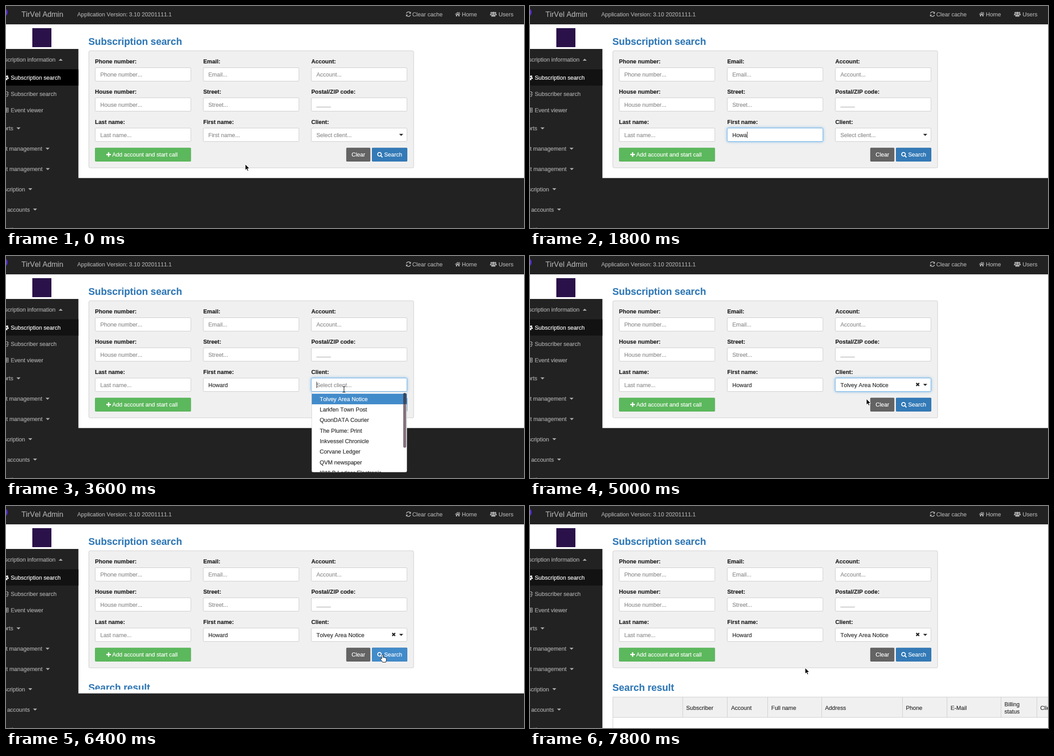
Recreate the animation shown at these times as an HTML page. Size 1141 by 491 pixels, loop 8 s.

```html
<!DOCTYPE html>
<html lang="en">
<head>
<meta charset="utf-8">
<style>
  html, body { margin: 0; width: 100%; height: 100%; overflow: hidden; background: #222; }
  svg { display: block; width: 1141px; height: 491px; }
  text {
    font: 12.52px "Liberation Sans", Arial, sans-serif; font-kerning: none; white-space: pre;
    color: #2b2b2b; fill: currentColor; stroke: currentColor; stroke-width: .2px;
  }
  .label text { font-weight: bold; color: #222; }
  .hint text { color: #8c8c8c; }
  .hint .mask { font-size: 11.26px; }
  .title { font-size: 21.46px; font-weight: bold; color: #337ab7; }
  .dark text { color: #acacac; }
  .dark .brand { font-size: 16.1px; }
  .dark .end { text-anchor: end; }
  .dark .on, .white text { color: #fff; }
  .icon { fill: none; stroke: #acacac; stroke-width: 1.7; }
  .thin { stroke-width: 1.2; }
  .glow { fill: #fff; stroke: #66afe9; filter: drop-shadow(0 0 3px rgba(102, 175, 233, .8)); }

  /* Every change is a hard cut on a shared eight second clock */
  .a { animation: 8s step-end -20ms infinite; }
  .active { animation-name: active; }
  .typing { animation-name: typing; }
  .typing-caret { animation-name: typing-caret; }
  .name-hint { animation-name: name-hint; }
  .name-glow { animation-name: name-glow; }
  .client-hover { animation-name: client-hover; }
  .client-glow { animation-name: client-glow; }
  .client-hint { animation-name: client-hint; }
  .client-arrow { animation-name: client-arrow; }
  .picked { animation-name: picked; }
  .menu { animation-name: menu; }
  .clear-hover { animation-name: clear-hover; }
  .search-hover { animation-name: search-hover; }
  .shutter { animation-name: shutter; }
  .pointer { animation-name: pointer; }
  .arrow { animation-name: arrow; }
  .beam { animation-name: beam; }
  .hand { animation-name: hand; }

  @keyframes active { 0% { fill: #000 } 2.5%, 100% { fill: #121212 } }
  @keyframes typing {
    0% { transform: translateX(0) }
    15% { transform: translateX(9px) }
    17.5% { transform: translateX(16px) }
    20% { transform: translateX(25px) }
    22.5% { transform: translateX(32px) }
    25% { transform: translateX(36.3px) }
    27.5%, 100% { transform: translateX(43.6px) }
  }
  @keyframes typing-caret { 0%, 32.5%, 100% { opacity: 0 } 10% { opacity: 1 } }
  @keyframes name-hint { 0% { opacity: 1 } 15%, 100% { opacity: 0 } }
  @keyframes name-glow { 0%, 40%, 100% { opacity: 0 } 10% { opacity: .35 } 12.5% { opacity: 1 } }
  @keyframes client-hover { 0%, 40%, 100% { opacity: 0 } 35% { opacity: 1 } }
  @keyframes client-glow { 0%, 77.5%, 100% { opacity: 0 } 40% { opacity: 1 } 70% { opacity: .8 } }
  @keyframes client-hint { 0% { opacity: 1 } 62.5%, 100% { opacity: 0 } }
  @keyframes client-arrow { 0%, 62.5%, 100% { opacity: 1 } 40% { opacity: 0 } }
  @keyframes picked { 0% { opacity: 0 } 62.5%, 100% { opacity: 1 } }
  @keyframes menu { 0%, 62.5%, 100% { opacity: 0 } 42.5% { opacity: 1 } }
  @keyframes clear-hover { 0%, 72.5%, 100% { opacity: 0 } 65% { opacity: 1 } }
  @keyframes search-hover { 0%, 85%, 100% { opacity: 0 } 75% { opacity: 1 } }
  @keyframes shutter {
    0% { transform: translateY(0) }
    80% { transform: translateY(34px) }
    82.5%, 100% { transform: translateY(150px) }
  }
  @keyframes arrow { 0%, 32.5%, 62.5%, 85%, 100% { opacity: 1 } 7.5%, 35%, 65% { opacity: 0 } }
  @keyframes beam { 0%, 15%, 32.5%, 50%, 100% { opacity: 0 } 7.5%, 30%, 40% { opacity: 1 } }
  @keyframes hand { 0%, 40%, 62.5%, 85%, 100% { opacity: 0 } 35%, 50%, 65% { opacity: 1 } }
  @keyframes pointer {
    0% { transform: translate(527px, 350px) }
    2.5% { transform: translate(520px, 337px) }
    5% { transform: translate(499px, 308px) }
    7.5% { transform: translate(478px, 287px) }
    10% { transform: translate(475.5px, 285.5px) }
    30% { transform: translate(482px, 286px) }
    32.5% { transform: translate(655px, 293px) }
    35% { transform: translate(736px, 292px) }
    37.5% { transform: translate(742px, 290px) }
    40% { transform: translate(744.5px, 295px) }
    50% { transform: translate(744px, 308px) }
    52.5% { transform: translate(743px, 313px) }
    55% { transform: translate(742px, 315px) }
    57.5% { transform: translate(741px, 316px) }
    65% { transform: translate(753px, 318px) }
    67.5% { transform: translate(763px, 321px) }
    70% { transform: translate(770px, 323px) }
    72.5% { transform: translate(805px, 327px) }
    75% { transform: translate(828px, 329px) }
    77.5% { transform: translate(829px, 329px) }
    85% { transform: translate(798px, 348px) }
    87.5% { transform: translate(738px, 353px) }
    90% { transform: translate(676px, 356px) }
    92.5% { transform: translate(634px, 358px) }
    95% { transform: translate(612px, 358px) }
    97.5%, 100% { transform: translate(606px, 358px) }
  }
</style>
</head>
<body>
<svg viewBox="0 0 1141 491">
  <defs>
    <rect id="box" width="210.7" height="29.7" rx="2"/>
    <path id="down" d="M-4.5 -2H4.5L0 2.5Z"/>
    <g id="people">
      <circle cx="-4.5" cy="-2.5" r="1.9"/><circle cx="4.5" cy="-2.5" r="1.9"/><circle cy="-2" r="2.8"/>
      <path d="M-7.5 3V1q0-1.5 2-1.5h2.2L-4.6 3ZM7.5 3V1q0-1.5-2-1.5H3.3L4.6 3ZM-4.5 6V4q0-3 3-3h3q3 0 3 3v2Z"/>
    </g>
  </defs>

  <rect width="1141" height="491" fill="#222"/>
  <path d="M159.500 40.500H1141V491H159.500ZM0 40.500H159.500V95H0Z" fill="#fff"/>
  <path d="M0 39.500H1141" stroke="#0c0c0c"/>

  <!-- Top bar -->
  <g class="dark">
    <circle cx="-7" cy="14" r="10.5" fill="#5b2fd6"/>
    <text class="brand" x="34" y="23.5">TirVel Admin</text>
    <text x="157" y="22.5">Application Version: 3.10 20201111.1</text>
    <g class="icon">
      <path d="M882 16.5a4.8 4.8 0 0 1 8.6-1.5M891 19.5a4.8 4.8 0 0 1-8.6 1.5"/>
      <path d="M892 12.5v4.6h-4.6ZM881 23.5v-4.6h4.6Z" fill="#acacac" stroke="none"/>
    </g>
    <text x="895" y="22.5">Clear cache</text>
    <path d="M989 18.3 995 13l6 5.3-.8 1L995 14.7 989.8 19.3ZM991 19.3l4-3.4 4 3.4V23h-2.8v-3h-2.4v3H991ZM998 13.4h1.5v3l-1.5-1.4Z" fill="#acacac"/>
    <text x="1004" y="22.5">Home</text>
    <use href="#people" x="1073.5" y="17.5" fill="#acacac"/>
    <text x="1085" y="22.5">Users</text>
  </g>

  <!-- Sidebar -->
  <rect x="58" y="49" width="42" height="42" fill="#2a1149"/>
  <g class="dark">
    <rect class="a active" y="140" width="159.5" height="36"/>
    <text class="end" x="109" y="122.5">Subscription information</text>
    <use href="#people" x="-1.5" y="158" fill="#fff"/>
    <text class="on" x="10.5" y="163">Subscription search</text>
    <path class="icon thin" d="M-4 189.5H3.5V200H-4M5.2 191v2M5.2 195v2M-2 196.5q2-3 3.5 0M0 193v1"/>
    <text x="10.5" y="199">Subscriber search</text>
    <path class="icon thin" d="M-5 225.5H4.8V235H-5M-5 228.5H5M-5 231.5H5M1 226V235"/>
    <text x="10.5" y="234.7">Event viewer</text>
    <text class="end" x="16" y="275">Reports</text>
    <text class="end" x="80" y="320">Client management</text>
    <text class="end" x="80.5" y="364.7">Product management</text>
    <text class="end" x="42" y="409.5">Subscription</text>
    <text class="end" x="52.5" y="454.5">User accounts</text>
    <text class="end" x="36" y="499.3">Settings</text>
    <g fill="#acacac">
      <path d="M116 121H125L120.5 116.5Z"/>
      <use href="#down" x="27.5" y="270.5"/>
      <use href="#down" x="91.5" y="315.5"/>
      <use href="#down" x="92" y="360.5"/>
      <use href="#down" x="53.5" y="405"/>
      <use href="#down" x="64" y="450"/>
    </g>
  </g>

  <!-- Search form -->
  <text class="title" x="181.5" y="86">Subscription search</text>
  <rect x="182.5" y="99" width="715.5" height="259" rx="3" fill="#f0f0f0" stroke="#ccc"/>
  <g class="label">
    <text x="196" y="127.3">Phone number:</text>
    <text x="434.5" y="127.3">Email:</text>
    <text x="672.5" y="127.3">Account:</text>
    <text x="196" y="193.5">House number:</text>
    <text x="434.5" y="193.5">Street:</text>
    <text x="672.5" y="193.5">Postal/ZIP code:</text>
    <text x="196" y="260.7">Last name:</text>
    <text x="434.5" y="260.7">First name:</text>
    <text x="672.5" y="260.7">Client:</text>
  </g>
  <g fill="#fff" stroke="#c8c8c8">
    <use href="#box" x="196.5" y="136.5"/><use href="#box" x="434.5" y="136.5"/><use href="#box" x="672.5" y="136.5"/>
    <use href="#box" x="196.5" y="203"/><use href="#box" x="434.5" y="203"/><use href="#box" x="672.5" y="203"/>
    <use href="#box" x="196.5" y="270"/><use href="#box" x="434.5" y="270"/><use href="#box" x="672.5" y="270"/>
  </g>
  <use class="a glow name-glow" href="#box" x="434.5" y="270"/>
  <use class="a client-hover" href="#box" x="672.5" y="270" fill="#e4e4e4" stroke="#adadad"/>
  <use class="a glow client-glow" href="#box" x="672.5" y="270"/>

  <text x="445.7" y="289.5">Howard</text>
  <g class="a typing">
    <rect x="445.5" y="276" width="60" height="18" fill="#fff"/>
    <path class="a typing-caret" d="M446.5 278V292" stroke="#222"/>
  </g>
  <g class="hint">
    <text x="207.7" y="156.3">Phone number...</text>
    <text x="445.7" y="156.3">Email...</text>
    <text x="683.7" y="156.3">Account...</text>
    <text x="207.7" y="222.7">House number...</text>
    <text x="445.7" y="222.7">Street...</text>
    <text class="mask" x="684" y="222">_____</text>
    <text x="207.7" y="289.5">Last name...</text>
    <text class="a name-hint" x="445.7" y="289.5">First name...</text>
    <text class="a client-hint" x="683.7" y="289.5">Select client...</text>
  </g>
  <g class="a picked">
    <text x="683.7" y="289.5">Tolvey Area Notice</text>
    <path d="M850.8 281 857.2 287.4M857.2 281 850.8 287.4" stroke="#222" stroke-width="2.6"/>
  </g>
  <use class="a client-arrow" href="#down" x="870.5" y="284.8" fill="#222"/>

  <!-- Buttons -->
  <g class="white">
    <rect x="196.5" y="314" width="210.5" height="29.5" rx="1" fill="#5cb85c" stroke="#52b152"/>
    <path d="M221 328.5H231M226 323.5V333.5" stroke="#fff" stroke-width="2.8"/>
    <text x="234" y="333">Add account and start call</text>
    <rect x="750" y="314" width="52" height="29.5" rx="1" fill="#636363" stroke="#595959"/>
    <rect class="a clear-hover" x="750" y="314" width="52" height="29.5" rx="1" fill="#747474" stroke="#595959"/>
    <text x="761.3" y="333">Clear</text>
    <rect x="806.5" y="314" width="77" height="29.5" rx="1" fill="#337ab7" stroke="#2f72ad"/>
    <rect class="a search-hover" x="806.5" y="314" width="77" height="29.5" rx="1" fill="#428bca" stroke="#3b82bf"/>
    <g fill="none" stroke="#fff" stroke-width="2">
      <circle cx="822.7" cy="328" r="4"/><path d="M825.5 331 829.3 334.8"/>
    </g>
    <text x="833" y="333">Search</text>
  </g>

  <!-- Results, uncovered by the shutter -->
  <text class="title" x="181.5" y="409.3">Search result</text>
  <path d="M182.5 422.5H1142V467.5H182.5Z" fill="#f0f0f0"/>
  <path d="M1142 422.5H182.5V491M182.5 467.5H1142M336.5 422.5v45M434.5 422.5v45M523.5 422.5v45M642.5 422.5v45M820.5 422.5v45M918.5 422.5v45M1037.5 422.5v45M1116.5 422.5v45" fill="none" stroke="#ccc"/>
  <text x="344" y="451">Subscriber</text>
  <text x="443" y="451">Account</text>
  <text x="531.5" y="451">Full name</text>
  <text x="650" y="451">Address</text>
  <text x="828" y="451">Phone</text>
  <text x="926.5" y="451">E-Mail</text>
  <text x="1045" y="443">Billing</text>
  <text x="1045" y="459">status</text>
  <text x="1124" y="451">Client</text>
  <g class="a shutter">
    <rect x="160" y="372" width="981" height="9" fill="#fff"/>
    <rect x="159" y="380.5" width="982" height="120" fill="#222"/>
  </g>

  <!-- Client menu -->
  <g class="a menu">
    <path d="M684.5 278V292" stroke="#222"/>
    <path d="M673.5 301H883V475q0 3-3 3H676.5q-3 0-3-3Z" fill="#fff" stroke="#bbb" stroke-width=".6"/>
    <rect x="673.5" y="304.5" width="209.5" height="23.5" fill="#428bca"/>
    <text x="691" y="320.6" style="color:#fff">Tolvey Area Notice</text>
    <text x="691" y="344">Larkfen Town Post</text>
    <text x="691" y="367.3">QuonDATA Courier</text>
    <text x="691" y="390.6">The Plume: Print</text>
    <text x="691" y="414">Inkvessel Chronicle</text>
    <text x="691" y="437.3">Corvane Ledger</text>
    <text x="691" y="460.6">QVM newspaper</text>
    <svg x="674" y="466" width="200" height="12" style="width:200px;height:12px"><text x="17" y="18">KWLB Ledger Electronic</text></svg>
    <rect x="875" y="303" width="6.5" height="121" rx="3.2" fill="#83707a"/>
    <rect x="875" y="303" width="6.5" height="25" rx="3.2" fill="#37485f"/>
  </g>

  <!-- Mouse pointer -->
  <g class="a pointer">
    <path class="a arrow" d="M0 0V13.2L3 10.4 5 15 7.2 14 5.2 9.6H9.4Z" stroke="#fff"/>
    <path class="a beam" d="M-3-6.5q2.5 0 3 1.2 .5-1.2 3-1.2M0-5.3V5.3M-3 6.5q2.5 0 3-1.2 .5 1.2 3 1.2" fill="none" stroke="#111" stroke-width="1.2"/>
    <path class="a hand" d="M-1.2 9V1.2a1.5 1.5 0 0 1 3 0V6.2c.8-.8 2.3-.6 2.6.4 .8-.6 2.2-.3 2.4.7 .9-.4 2 .1 2 1.3v3.2c0 1.5-1 2.3-1.2 4.7H.4C0 14.3-2.6 12.4-4 9.9c-.8-1.4.8-2.4 1.9-1.4Z" fill="#fff" stroke="#111"/>
  </g>
</svg>
</body>
</html>
```
